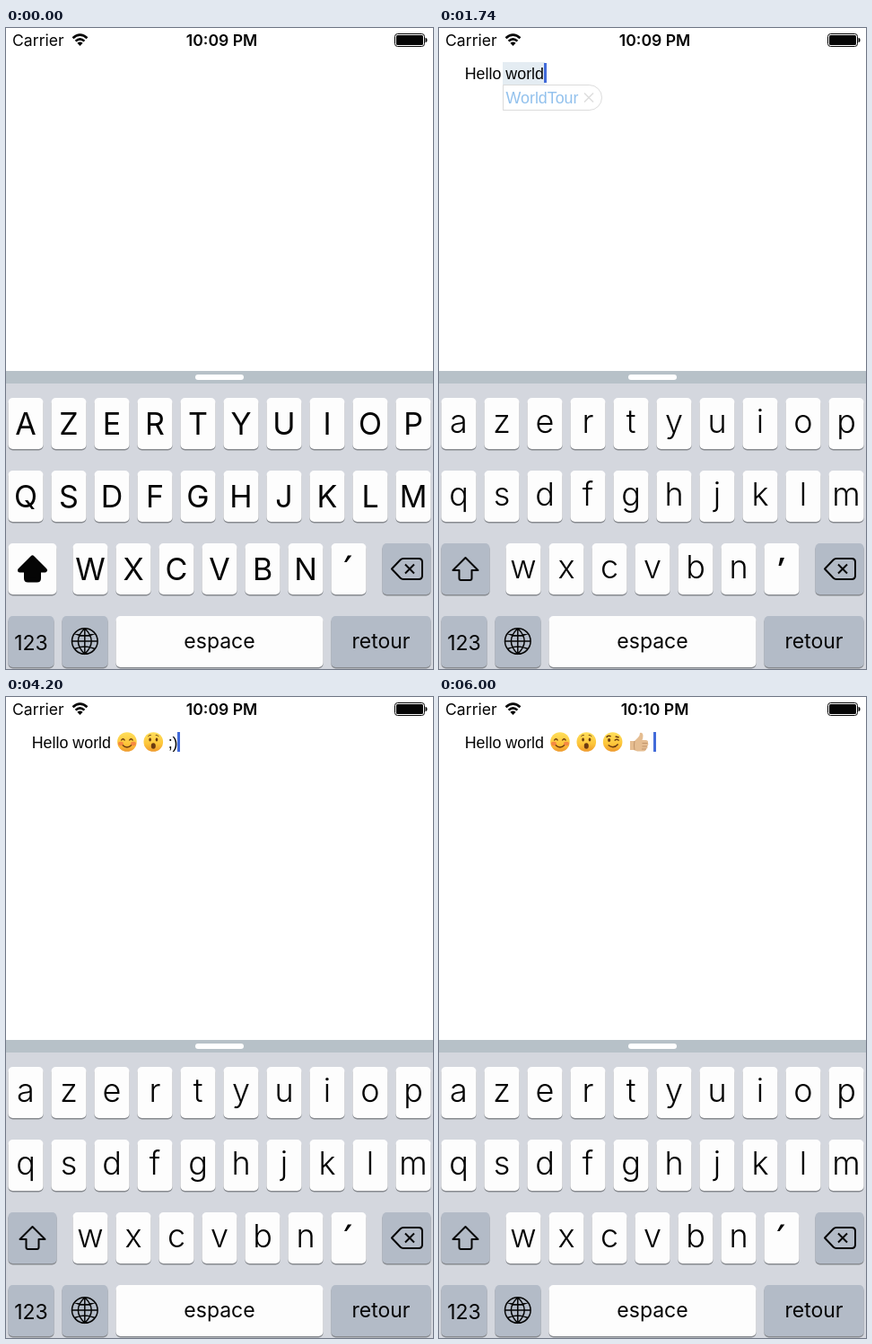
An HTML page with a canvas that plays this animation: 476 by 714 pixels, repeating every 6.06 s.

```html
<!DOCTYPE html>
<html lang="fr">
<head>
<meta charset="utf-8">
<style>
  html, body { margin: 0; width: 100%; height: 100%; overflow: hidden; background: #fff; }
  canvas { display: block; width: 476px; height: 714px; }
</style>
</head>
<body>
<canvas width="476" height="714"></canvas>
<script>
const ctx = document.querySelector('canvas').getContext('2d');
const LOOP = 6060, STEP = 60;
const UI = 'Inter, sans-serif';
const NOTE = '17.85px "Liberation Sans", Arial, sans-serif';
const NOTE_X = 28.7, EMOJI_ADVANCE = 24.4;
const BLACK = '#050505', WHITE_KEY = '#fdfdfd', GRAY_KEY = '#b3bbc7';

// Digits 1 to 4 stand for the emoji faces.
const world = 'Hello world ';
const typing = [
  [0, ''], [60, 'H'], [120, 'He'], [180, 'Hel'], [300, 'Hell'], [360, 'Hello'],
  [420, 'Hello '], [540, 'Hello w'], [600, 'Hello wo'], [840, 'Hello wor'],
  [960, 'Hello worl'], [1020, 'Hello world'], [1920, world], [1980, world + ':'],
  [2100, world + ':)'], [2700, world + '1 '], [3300, world + '1 :'],
  [3420, world + '1 :O'], [3720, world + '1 2 '], [4080, world + '1 2 ;'],
  [4140, world + '1 2 ;)'], [4500, world + '1 2 3 '], [4800, world + '1 2 3 ('],
  [4860, world + '1 2 3 (y'], [4920, world + '1 2 3 (y)'], [4980, world + '1 2 3 4 ']
];
const caretFade = [[0, 0], [60, 1], [2340, 1], [2520, 0], [2640, 0], [2700, 1], [2820, 1],
  [3000, 0], [3120, 0], [3300, 1], [5220, 1], [5400, 0], [5520, 0], [5700, 1], [LOOP, 1]];
const popupFade = [[0, 0], [1140, 0], [1380, 1], [1620, 1], [1740, .5], [1800, 0], [LOOP, 0]];

function valueAt(keys, t) {
  const i = keys.findIndex(k => k[0] > t);
  const [t0, a] = keys[i - 1], [t1, b] = keys[i];
  return a + (b - a) * (t - t0) / (t1 - t0);
}

function label(text, x, y, font, color = BLACK, align = 'center') {
  ctx.font = font;
  ctx.textAlign = align;
  ctx.fillStyle = color;
  ctx.fillText(text, x, y);
}

function box(x, y, w, h, r, color) {
  ctx.fillStyle = color;
  ctx.beginPath();
  ctx.roundRect(x, y, w, h, r);
  ctx.fill();
}

function stroke(d, color = BLACK, width = 2) {
  ctx.strokeStyle = color;
  ctx.lineWidth = width;
  ctx.stroke(new Path2D(d));
}

function fill(d, color = BLACK) {
  ctx.fillStyle = color;
  ctx.fill(new Path2D(d));
}

function dot(x, y, rx, ry, color) {
  ctx.fillStyle = color;
  ctx.beginPath();
  ctx.ellipse(x, y, rx, ry, 0, 0, 7);
  ctx.fill();
}

function key(x, y, w, color = WHITE_KEY) {
  box(x, y + 1.5, w, 57, 5, '#888b90');
  box(x, y, w, 57, 5, color);
}

function statusBar(clock) {
  label('Carrier', 7, 20, '17.6px ' + UI, BLACK, 'left');
  label(clock, 240.5, 20, '600 17.6px ' + UI);
  stroke('M74.5 11.3Q82.5 3.9 90.5 11.3M77.6 14.6Q82.5 10.2 87.4 14.6', BLACK, 2.6);
  fill('M79.4 16.7Q82.5 14.2 85.6 16.7L82.5 20Z');
  ctx.strokeStyle = BLACK;
  ctx.lineWidth = 1;
  ctx.beginPath();
  ctx.roundRect(433.5, 6.5, 33, 14, 3);
  ctx.stroke();
  box(435, 8, 30, 11, 1.5, BLACK);
  box(467.5, 11, 2, 5, [0, 2, 2, 0], BLACK);
}

function emoji(kind, x) {
  ctx.save();
  ctx.translate(x, 50);
  const brown = '#6b3a10';
  if (kind === '4') {
    fill('M-10-1H-5L-1-5Q1-7 1-10Q4-11 4.5-7Q4.5-4 3.5-2H8Q10.5-1.5 10 1Q11 3 9.5 4.5Q10 7 8 8Q7.5 10.5 5 10.5H-2L-6 9H-10Z', '#e5bd91');
    stroke('M3.5 1.5H9.5M3.5 5H9M3 8H8M-5-1Q-6 4-5 9', '#b98c62', .8);
  } else {
    const skin = ctx.createLinearGradient(0, -11, 0, 11);
    skin.addColorStop(0, '#ffdf5b');
    skin.addColorStop(.6, '#fdc63a');
    skin.addColorStop(1, '#ee982b');
    dot(0, 0, 10.8, 10.8, skin);
    if (kind === '1') {
      dot(-7, 2, 3, 2.3, '#f58a42');
      dot(7, 2, 3, 2.3, '#f58a42');
      stroke('M-6.5-1.5Q-4.5-5-2.5-1.5M2.5-1.5Q4.5-5 6.5-1.5M-5 3.5Q0 8.5 5 3.5', brown, 1.4);
    } else if (kind === '2') {
      dot(-3.7, -2.5, 1.3, 1.9, brown);
      dot(3.7, -2.5, 1.3, 1.9, brown);
      dot(0, 4.5, 2.5, 3.3, brown);
      stroke('M-6-6Q-4.5-8-2.5-7.5M6-6Q4.5-8 2.5-7.5', brown, .9);
    } else {
      dot(-4, -2, 1.6, 2, brown);
      stroke('M2-1.5Q4.5-4 7-1.5M-5 3.5Q1 8.5 6 2.5M-7-5Q-5-8-2-6M3-6L7-5', brown, 1.4);
    }
  }
  ctx.restore();
}

function note(text, caret, popup) {
  if (popup) {
    ctx.globalAlpha = popup;
    box(71, 38, 47, 25, 0, '#c9dae6');
    ctx.strokeStyle = '#b8b8b8';
    ctx.lineWidth = 1;
    ctx.beginPath();
    ctx.roundRect(71.5, 63.5, 110, 28, [0, 14, 14, 0]);
    ctx.stroke();
    label('WorldTour', 74.5, 84, NOTE, '#2583dc', 'left');
    stroke('M162 72.5L172 82.5M172 72.5L162 82.5', '#bdbdbd', 1.5);
    ctx.globalAlpha = 1;
  }
  let x = NOTE_X;
  for (const part of text.split(/([1-4])/)) {
    if (/^[1-4]$/.test(part)) {
      emoji(part, x + 13);
      x += EMOJI_ADVANCE;
    } else {
      label(part, x, 57, NOTE, BLACK, 'left');
      x += ctx.measureText(part).width;
    }
  }
  ctx.globalAlpha = caret;
  box(Math.round(x - .4), 39, 3, 22, 0, '#426bd9');
  ctx.globalAlpha = 1;
}

function accent(last) {
  if (/[oO]/.test(last)) stroke('M376 593L381.5 588.5L387 593', BLACK, 2);
  else if (/[a-zA-Z]/.test(last) && last !== 'e') fill('M380.5 590H385L381.3 599H378.5Z');
  else fill('M381 587.5H385.3L379.7 595H377Z');
}

function keyboard(upper, last) {
  box(0, 382, 476, 332, 0, '#d4d7de');
  box(0, 382, 476, 14, 0, '#b7c1c8');
  box(211, 386, 54, 6, 3, '#fff');

  const font = (upper ? '400 34px ' : '300 36px ') + UI;
  const row = (letters, x, y) => [...letters].forEach((c, i) => {
    const left = x + 48 * i;
    key(left, y, 39);
    label(upper ? c.toUpperCase() : c, left + 19.5, y + (upper ? 41 : 39), font);
  });
  row('azertyuiop', 2.5, 412);
  row('qsdfghjklm', 2.5, 493);
  row('wxcvbn', 74.5, 574);
  key(362.5, 574, 39);
  accent(last);

  key(2.5, 574, 54, upper ? WHITE_KEY : GRAY_KEY);
  ctx.lineJoin = 'round';
  const arrow = 'M29.5 590L43.5 604H36.5V613Q36.5 615 34.5 615H24.5Q22.5 615 22.5 613V604H15.5Z';
  if (upper) fill(arrow);
  stroke(arrow, BLACK, upper ? 5 : 2);

  key(419.5, 574, 54, GRAY_KEY);
  stroke('M430 602.5L439.5 592.5Q441 591 443 591H460Q464 591 464 595V610Q464 614 460 614H443Q441 614 439.5 612.5ZM445 597.5L455 607.5M455 597.5L445 607.5', BLACK, 2);
  ctx.lineJoin = 'miter';

  key(2.5, 655, 51, GRAY_KEY);
  key(62.5, 655, 51, GRAY_KEY);
  key(122.5, 655, 231);
  key(362.5, 655, 111, GRAY_KEY);
  const small = '23px ' + UI;
  label('123', 28, 693, small);
  label('espace', 238, 691, small);
  label('retour', 418, 691, small);
  stroke('M73.5 683a14.3 14.3 0 1 0 28.6 0a14.3 14.3 0 1 0-28.6 0H102M87.8 668.7V697.3M87.8 668.7Q73 683 87.8 697.3Q102.6 683 87.8 668.7M76.5 674.5Q87.8 679.5 99 674.5M76.5 691.5Q87.8 686.5 99 691.5', BLACK, 1.5);
}

function draw(now) {
  const t = Math.floor(now % LOOP / STEP) * STEP;
  const text = typing.findLast(step => step[0] <= t)[1];
  ctx.fillStyle = '#fff';
  ctx.fillRect(0, 0, 476, 714);
  statusBar(t < 5760 ? '10:09 PM' : '10:10 PM');
  note(text, valueAt(caretFade, t), valueAt(popupFade, t));
  keyboard(!text, text.slice(-1));
}

const start = performance.now();
function frame() {
  draw(performance.now() - start);
  requestAnimationFrame(frame);
}
frame();
</script>
</body>
</html>
```
